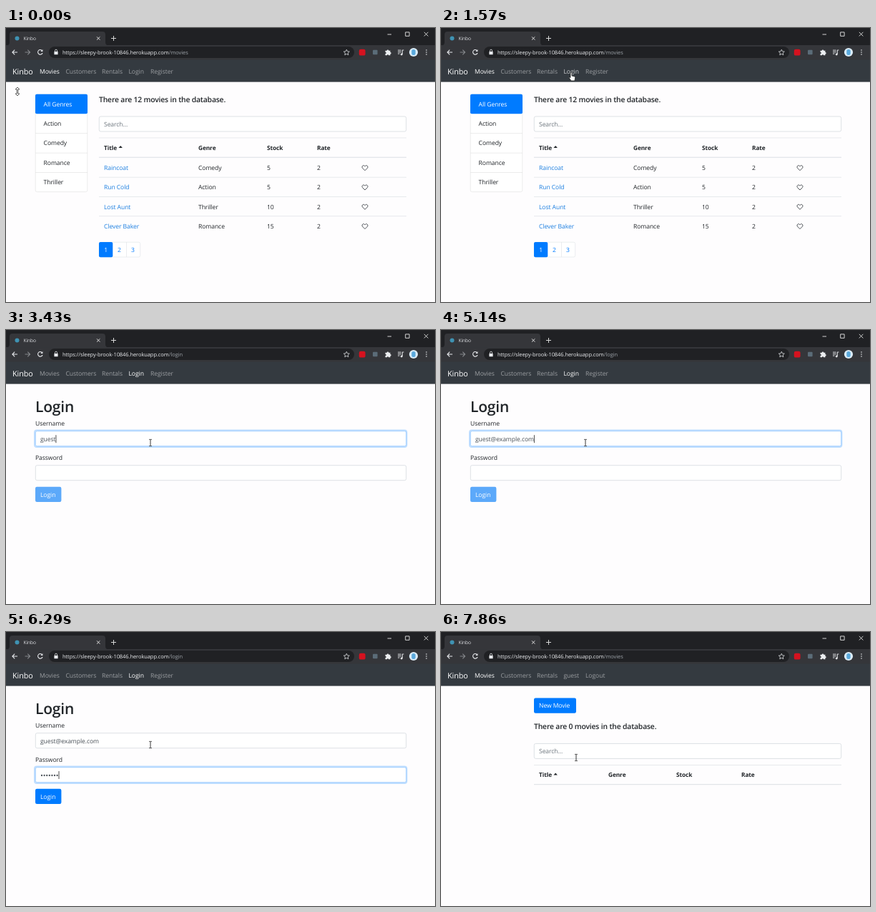
Write an HTML page that moves like this. It is 600x384 px and loops after 8000 ms.

```html
<!DOCTYPE html>
<html lang="en">
<head>
<meta charset="utf-8">
<title>Movie rental app</title>
<style>
html, body { margin: 0; width: 100%; height: 100%; overflow: hidden; background: #fefdfe; }
svg { display: block; width: 100%; height: 100%; }
text {
  font-family: "Open Sans", "Noto Sans", sans-serif;
  letter-spacing: -.01em;
  text-rendering: geometricPrecision;
  white-space: pre;
}
</style>
</head>
<body>
<svg id="stage" viewBox="0 0 600 384"></svg>
<script>
const stage = document.getElementById('stage');
const BLUE = '#007bff', INK = '#212529', LINE = '#dee2e6', GREY = '#495057';
const STEP = 1000 / 7, LOOP = 8000;

function add(parent, tag, attrs = {}) {
  const el = document.createElementNS('http://www.w3.org/2000/svg', tag);
  for (const k in attrs) el.setAttribute(k, attrs[k]);
  return parent.appendChild(el);
}
const group = (parent = stage) => add(parent, 'g');
const rect = (p, x, y, width, height, fill, more) =>
  add(p, 'rect', { x, y, width, height, fill, ...more });
const path = (p, d, stroke, width = 1, more) =>
  add(p, 'path', { d, stroke, 'stroke-width': width, fill: 'none', ...more });
const dot = (p, cx, cy, r, fill) => add(p, 'circle', { cx, cy, r, fill });
function text(p, x, y, str, fill = INK, size = 8.6, weight = 400, more) {
  const el = add(p, 'text', { x, y, fill, 'font-size': size, 'font-weight': weight, ...more });
  el.textContent = str;
  return el;
}
const show = (el, on) => el.setAttribute('display', on ? 'inline' : 'none');

// Browser frame
function drawBrowser() {
  const g = group();
  rect(g, 0, 0, 600, 25, '#202124');
  rect(g, 0, 24, 600, 21, '#35363a');
  path(g, 'M1 24.5Q5 24 5 20V9Q5 5 9 5H135Q139 5 139 9V20Q139 24 143 24.5Z', 'none', 0, { fill: '#35363a' });
  dot(g, 15.5, 14.5, 3, '#3f93b3');
  text(g, 24.5, 17.2, 'Kinbo', '#dfe1e5', 6.6);
  path(g, 'M127 12.3l4.4 4.4m0-4.4l-4.4 4.4', '#e0e0e0', 1);
  path(g, 'M147 14.5h7m-3.5-3.5v7', '#d8d8d8', 1);
  path(g, 'M533.5 9h5.5M558.7 5.9h5.4v5.4h-5.4zM584.8 5.8l5.6 5.6m0-5.6l-5.6 5.6', '#e8e8e8', .9);

  path(g, 'M16 34H9m3.2-3.3L8.9 34l3.3 3.3', '#e8eaed', 1.1);
  path(g, 'M26.5 34h7m-3.2-3.3l3.3 3.3-3.3 3.3', '#85878b', 1.1);
  path(g, 'M50.4 31.7A3.3 3.3 0 1 0 51 35', '#e8eaed', 1.1);
  path(g, 'M51.4 30v3h-3z', 'none', 0, { fill: '#e8eaed' });
  rect(g, 60, 26, 427, 16, '#202124', { rx: 8 });
  rect(g, 67.4, 33, 5.2, 4.2, '#e8eaed', { rx: .5 });
  path(g, 'M68.5 33v-1.3a1.5 1.5 0 0 1 3 0V33', '#e8eaed', .8);
  const url = text(g, 79, 36.8, 'https://sleepy-brook-10846.herokuapp.com', '#e8eaed', 7.5);
  const tail = add(url, 'tspan', { fill: '#9aa0a6' });

  path(g, 'M476.3 30.2l1.2 2.6 2.8.3-2.1 1.9.6 2.8-2.5-1.4-2.5 1.4.6-2.8-2.1-1.9 2.8-.3z', '#e0e2e5', .8);
  rect(g, 493.8, 29.8, 8.8, 8.8, '#d5121f', { rx: 2.2 });
  rect(g, 513, 30.7, 6.6, 6.6, '#5b6c78', { rx: 1 });
  path(g, 'M530.5 31.8h2.2a1.3 1.3 0 0 1 2.6 0h2.1v2.2a1.3 1.3 0 0 1 0 2.6v1.7h-2.3a1.1 1.1 0 0 0-2.2 0h-2.4v-2.2a1.2 1.2 0 0 0 0-2.4z',
    'none', 0, { fill: '#eceef0' });
  path(g, 'M548 31.2h4.6M548 33.6h4.6M548 36h2.6M554.3 37v-6h2', '#e8eaed', 1);
  dot(g, 553.2, 37, 1.4, '#e8eaed');
  dot(g, 570, 34, 6.1, '#dcecf7');
  rect(g, 567.3, 30, 5.4, 8, '#5aa9dc', { rx: 2.5 });
  for (const y of [31, 34, 37]) dot(g, 588, y, .8, '#e8eaed');

  rect(g, 0, 44.6, 600, 31, '#343a40');
  text(g, 9, 65, 'Kinbo', '#fff', 10.8);
  return tail;
}

// Navbar links; the active one is white
function drawNav(p, items, active) {
  const xs = [47, 83.5, 134, 171.5, 202];
  return items.map((s, i) =>
    text(p, xs[i], 64, s, s === active ? '#fff' : '#9a9da0', 8.6, s === active ? 500 : 400));
}

function field(p, x, y, width) {
  return rect(p, x + .3, y + .3, width - .6, 21, '#fff', { rx: 2.2, stroke: '#ced4da', 'stroke-width': .7 });
}
function button(p, x, y, width, label) {
  const box = rect(p, x, y, width, 21.2, BLUE, { rx: 2.2 });
  text(p, x + 7, y + 13.7, label, '#fff');
  return box;
}
function heading(p, y, n) {
  text(p, 130, y, `There are ${n} movies in the database.`, INK, 10.4, 600, { style: 'letter-spacing:-.018em' });
}
function tableHead(p, y, xs) {
  field(p, 130, y - 30.3, 430);
  text(p, 137, y - 16.2, 'Search...', '#6c757d');
  rect(p, 130, y - .4, 430, .7, LINE);
  ['Title', 'Genre', 'Stock', 'Rate'].forEach((s, i) => text(p, xs[i], y + 17, s, INK, 8.3, 700));
  path(p, `M157.5 ${y + 14}l2.7-2.9 2.7 2.9z`, 'none', 0, { fill: INK });
  rect(p, 130, y + 26.7, 430, 1.1, LINE);
}

function drawList() {
  const g = group(), cols = [137, 269, 365, 435];
  const links = drawNav(g, ['Movies', 'Customers', 'Rentals', 'Login', 'Register'], 'Movies');
  rect(g, 41.2, 93, 72.6, 136.6, '#fff', { rx: 2.2, stroke: '#dfdfdf', 'stroke-width': .6 });
  rect(g, 41, 92.7, 73, 27.6, BLUE, { rx: 2 });
  ['All Genres', 'Action', 'Comedy', 'Romance', 'Thriller'].forEach((s, i) => {
    const y = 109.7 + i * 27.35;
    text(g, 52.6, y, s, i ? INK : '#fff');
    if (i && i < 4) rect(g, 41, y + 10.4, 73, .6, '#dfdfdf');
  });
  heading(g, 103.6, 12);
  tableHead(g, 154, cols);
  const rows = [
    ['Raincoat', 'Comedy', 5], ['Run Cold', 'Action', 5],
    ['Lost Aunt', 'Thriller', 10], ['Clever Baker', 'Romance', 15]
  ];
  rows.forEach((row, i) => {
    const y = 199 + i * 27.3;
    [...row, 2].forEach((s, c) => text(g, cols[c], y, s, c ? INK : '#1c7fe0'));
    path(g, `M502 ${y + .7}l-3.5-3.5c-1.7-2 1.4-5.3 3.5-2.3 2.1-3 5.2.3 3.5 2.3z`, '#30353a', .85);
    if (i) rect(g, 130, y - 17.5, 430, .7, LINE);
  });
  rect(g, 130.3, 300.2, 57.4, 20.8, '#fff', { rx: 2.2, stroke: LINE, 'stroke-width': .6 });
  rect(g, 130, 300, 19.3, 21.2, BLUE, { rx: 2 });
  rect(g, 168.2, 300, .6, 21, LINE);
  [1, 2, 3].forEach((n, i) =>
    text(g, 139.6 + i * 18.9, 313.7, n, i ? BLUE : '#fff', 8.6, 400, { 'text-anchor': 'middle' }));
  return { g, login: links[3] };
}

function drawLogin() {
  const g = group();
  drawNav(g, ['Movies', 'Customers', 'Rentals', 'Login', 'Register'], 'Login');
  text(g, 41, 115, 'Login', INK, 21, 600);
  text(g, 41, 134, 'Username');
  text(g, 41, 181.8, 'Password');
  const ring = rect(g, 40, 0, 520.4, 23.4, 'none', { rx: 3, stroke: '#bfdeff', 'stroke-width': 2 });
  const fields = [field(g, 41, 141.4, 519), field(g, 41, 189.4, 519)];
  const name = text(g, 48, 155.8, '', GREY);
  const dots = Array.from({ length: 8 }, (_, i) => dot(g, 50 + i * 3.6, 201, 1.15, GREY));
  const caret = rect(g, 0, 0, .8, 11, '#222');
  const btnRing = rect(g, 40, 219, 38, 23.2, 'none', { rx: 3, stroke: '#a6d0ff', 'stroke-width': 2 });
  const btn = button(g, 41, 219.8, 36.4, 'Login');
  return { g, ring, fields, name, dots, caret, btnRing, btn };
}

function drawEmpty() {
  const g = group();
  drawNav(g, ['Movies', 'Customers', 'Rentals', 'guest', 'Logout'], 'Movies');
  button(g, 130, 92.5, 59, 'New Movie');
  heading(g, 136, 0);
  tableHead(g, 186.4, [137, 234, 329, 420]);
  return { g };
}

function drawPointers() {
  const make = (d, fill, stroke, w) => {
    const g = group();
    path(g, d, stroke, w, { fill, 'stroke-linejoin': 'round' });
    return g;
  };
  return {
    size: make('M0-6l2.8 3H.8v6h2L0 6l-2.8-3h2v-6h-2z', '#fff', '#333', .8),
    arrow: make('M0 0v9.2l2.2-2 1.5 3.2 1.5-.7-1.5-3.1h2.9z', '#fff', '#222', .8),
    hand: make('M0 0q1 0 1 1.2V5l3.8 1q1 .3.9 1.5L5 12H0L-3 7.6q0-1.4 2 0V1.2Q-1 0 0 0z', '#fff', '#222', .8),
    beam: make('M-1.8-4.6h1.3L0-4.2l.5-.4h1.3M0-4.2v8.4M-1.8 4.6h1.3L0 4.2l.5.4h1.3', 'none', '#222', .9)
  };
}

const urlTail = drawBrowser();
const list = drawList(), login = drawLogin(), empty = drawEmpty();
const pointers = drawPointers();

// [step, x, y, pointer shape until the next key]
const MOVES = [
  [0, 16, 89, 'size'], [1, 24, 97, 'arrow'], [6, 240, 236, 'arrow'], [7, 238, 226, 'arrow'],
  [11, 182, 62, 'hand'], [13, 183, 65, 'arrow'], [15, 198, 148, 'beam'], [16, 202, 158, 'beam'],
  [48, 202, 158, 'arrow'], [51, 66, 230, 'hand'], [52, 66, 231, 'hand'], [53, 72, 228, 'arrow'],
  [55, 189, 176, 'beam']
];
const LOGIN_AT = 13, PASS_AT = 37, SUBMIT_AT = 51, DONE_AT = 53;
const NAME = 'guest@example.com';
const NAME_KEYS = [19, 20, 21, 23, 24, ...Array.from({ length: 12 }, (_, i) => Math.min(26 + i, 36))];
const PASS_KEYS = [38, 39, 39, 40, 41, 43, 44, 45];
const typed = (keys, k) => keys.filter(s => s <= k).length;

function movePointer(k) {
  let i = MOVES.length - 1;
  while (MOVES[i][0] > k) i--;
  const a = MOVES[i], b = MOVES[i + 1] || a;
  const u = b === a ? 0 : (k - a[0]) / (b[0] - a[0]);
  const e = u * u * (3 - 2 * u);
  for (const s in pointers) show(pointers[s], s === a[3]);
  const x = a[1] + (b[1] - a[1]) * e, y = a[2] + (b[2] - a[2]) * e;
  pointers[a[3]].setAttribute('transform', `translate(${x} ${y})`);
}

function updateLogin(k) {
  const inPass = k >= PASS_AT, sent = k >= SUBMIT_AT;
  const n = typed(PASS_KEYS, k);
  login.name.textContent = NAME.slice(0, typed(NAME_KEYS, k));
  login.dots.forEach((d, i) => show(d, i < n));
  login.btn.setAttribute('fill', n ? BLUE : '#5ca9fa');
  show(login.btnRing, sent);
  show(login.ring, !sent);
  login.ring.setAttribute('y', inPass ? 188.5 : 140.5);
  login.fields.forEach((f, i) =>
    f.setAttribute('stroke', !sent && inPass === (i === 1) ? '#80bdff' : '#ced4da'));
  const x = inPass ? 48.4 + n * 3.6 : 48 + login.name.getComputedTextLength();
  login.caret.setAttribute('x', x);
  login.caret.setAttribute('y', inPass ? 195 : 147.2);
  show(login.caret, !sent && !(k >= 16 && k < 19) && k < 49);
}

function render(t) {
  const k = Math.floor((t + 5) / STEP) % 56;
  const onLogin = k >= LOGIN_AT && k < DONE_AT;
  show(list.g, k < LOGIN_AT);
  show(login.g, onLogin);
  show(empty.g, k >= DONE_AT);
  urlTail.textContent = onLogin ? '/login' : '/movies';
  list.login.setAttribute('fill', k >= 11 ? '#ccced0' : '#9a9da0');
  if (onLogin) updateLogin(k);
  movePointer(k);
}

function loop() {
  render(performance.now() % LOOP);
  requestAnimationFrame(loop);
}
loop();
</script>
</body>
</html>
```
